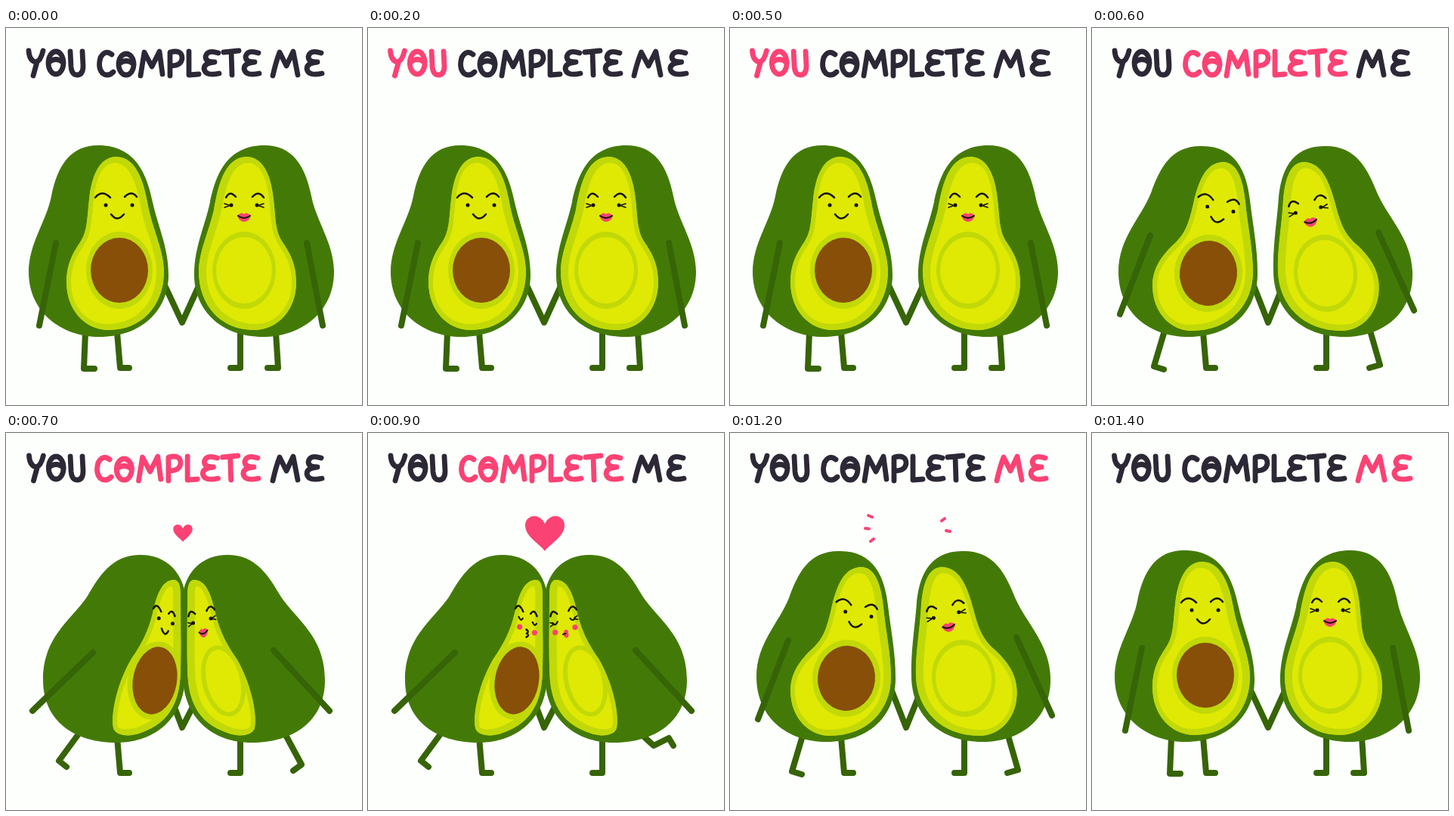
Animation of 471 by 498 pixels, one loop 1.5 s. Source, as an HTML page with a canvas:

```html
<!DOCTYPE html>
<html lang="en">
<head>
<meta charset="utf-8">
<title>You complete me</title>
<style>
html, body { margin: 0; width: 100%; height: 100%; overflow: hidden; background: #fdfffc; }
canvas { display: block; }
</style>
</head>
<body>
<canvas id="stage" width="471" height="498" role="img" aria-label="YOU COMPLETE ME"></canvas>
<script>
const ctx = document.getElementById('stage').getContext('2d');
const INK = '#2d2836', PINK = '#fb4274', BODY = '#437a07', LIMB = '#366407',
      RIM = '#c1d908', FLESH = '#dfe903', PIT = '#874f08', FACE = '#17140c';

// mirror: x of the left shape plus x of the right one; shear: extra tilt of the right one.
// pits: x, y, outer rx, ry, inner rx, ry, tilt.  faces: x, y, x scale, y slant, x slant.
const POSES = {
  apart: {
    mirror: 464, shear: 0,
    body: 'M122 155C85 155 68 182 60 222C54 254 30 285 30 322C30 376 74 408 124 408C178 408 215 374 215 326C215 290 201 262 194 230C187 196 173 155 122 155Z',
    flesh: 'M145 170C122 171 113 198 110 226C107 252 108 268 98 283C88 298 80 312 80 336C80 372 104 399 136 399C180 399 209 366 209 322C209 296 196 270 189 240C184 212 176 170 145 170Z',
    pits: [[150, 320, 44, 51, 38, 43, 0], [315, 320, 42, 51, 37, 44, 0]],
    faces: [[148, 236, 1, 0, 0], [315, 236, 1, 0, 0]],
    arms: 'M66 284L44 393M398 284L419 393',
    limbs: 'M210 340L233 389L254 343M105 402L103 450H117M357 402L360 449H346'
  },
  lean: {
    mirror: 462, shear: .035,
    body: 'M144 156C104 156 90 185 78 218C64 252 35 278 35 322C35 376 76 408 128 408C184 408 219 374 219 324C219 290 213 262 209 228C205 190 190 155 144 156Z',
    flesh: 'M173 177C150 178 141 202 134 232C128 258 124 270 110 284C92 300 80 318 80 340C80 376 104 400 132 400C182 400 213 366 213 322C213 292 206 262 203 230C200 200 192 177 173 177Z',
    pits: [[154, 324, 45, 51, 38, 43, .1], [309, 324, 42, 51, 37, 44, -.1]],
    faces: [[168, 241, .98, .19, -.17], [286.5, 242.5, .98, -.22, .22]],
    arms: 'M77 274L37 378M379 270L426 373',
    limbs: 'M213 338L233 389L250 347M96 400L82 447L95 451M368 400L381 445L367 449'
  },
  kiss: {
    mirror: 471, shear: 0,
    body: 'M176 161C140 162 124 188 108 215C88 246 49 268 49 326C49 382 92 409 146 409C198 409 236 376 237 322C239 280 241 246 237 212C232 182 210 160 176 161Z',
    flesh: 'M222 194C206 194 199 215 194 238C188 262 180 278 166 298C148 328 138 370 142 390C146 401 165 403 186 393C222 378 231 345 231 310C232 280 231 250 231 215C231 202 229 194 222 194Z',
    pits: [[197, 327, 36, 52, 29, 45, .17], [287.5, 327.5, 28, 48, 22, 42, -.24]],
    faces: [[210.5, 250, .52, .2, 0], [259.5, 250, .69, -.18, .13]],
    arms: 'M115 290L35 367M354 287L428 367',
    limbs: 'M222 360L233 389L248 360M95 399L70 433L80 441'
  }
};
const INNER_LEGS = 'M147 402L151 449H163M310 402V449H297';
const LEG_DOWN = 'M370 399L391 438L380 446', LEG_UP = 'M366 402L378 413L398 403L404 413';

const letterO = (x, y, rx, ry) =>
  `M${x - rx} ${y}a${rx} ${ry} 0 1 1 ${2 * rx} 0a${rx} ${ry} 0 1 1 ${-2 * rx} 0q${rx} -9 ${2 * rx} 0`;
const letterE = x => `M${x} 33q-15 -5 -17 5q0 7 12 7q-14 1 -14 9q2 10 20 6`;
// Each word has three slightly different [left, right] extents that cycle.
const WORDS = [
  { path: 'M30 30Q31 44 40 45Q46 43 49 30M41 45L36 63' + letterO(66, 46, 10, 15) + 'M85 31L86 51Q87 62 94 62Q102 62 102 50L101 31',
    spans: [[30, 102], [30.5, 102], [29.5, 101]] },
  { path: 'M140 35Q131 28 125 39Q121 53 128 60Q135 65 142 58' + letterO(159, 48, 10, 14) +
      'M178 63L183 32L193 51L203 31L207 61M217 63V32Q233 28 233 40Q232 50 218 50M242 31V62L255 61' +
      letterE(281) + 'M288 32L308 30M298 31L299 62' + letterE(334),
    spans: [[123, 334], [120, 333], [122, 333]] },
  { path: 'M353 63Q357 45 362 32L371 50L380 31L386 62' + letterE(417),
    spans: [[353, 417], [353, 417], [352, 420]] }
];

function moved(path, matrix) {
  const result = new Path2D();
  result.addPath(new Path2D(path), matrix);
  return result;
}

function fill(path, color) {
  ctx.fillStyle = color;
  ctx.fill(new Path2D(path));
}

function stroke(path, color, width) {
  ctx.strokeStyle = color;
  ctx.lineWidth = width;
  ctx.stroke(new Path2D(path));
}

function ellipse(x, y, rx, ry, tilt, color) {
  ctx.fillStyle = color;
  ctx.beginPath();
  ctx.ellipse(x, y, rx, ry, tilt, 0, 7);
  ctx.fill();
}

function drawBody({ mirror, shear, body, flesh, pits }, side) {
  const [x, y, rx, ry, innerX, innerY, tilt] = pits[side];
  const matrix = new DOMMatrix(side ? [-1, 0, shear, 1, mirror - shear * 408, 0] : [1, 0, 0, 1, 0, 0]);
  const cut = moved(flesh, matrix);
  ctx.save();
  fill(moved(body, matrix), BODY);
  ctx.clip(cut);
  fill(cut, FLESH);
  stroke(moved(flesh, matrix.translate(-2, 0)), RIM, 16);
  ellipse(x, y, rx, ry, tilt, RIM);
  ellipse(x, y, innerX, innerY, tilt, side ? FLESH : PIT);
  ctx.restore();
}

function drawFace([x, y, scaleX, slantY, slantX], side, closed, kissing) {
  const matrix = new DOMMatrix([scaleX, slantY, slantX, 1, x, y]);
  const line = (path, width = 2.2) => stroke(moved(path, matrix), FACE, width);
  const dot = (dx, dy, r, color) => {
    const p = matrix.transformPoint({ x: dx, y: dy });
    ellipse(p.x, p.y, r, r, 0, color);
  };
  line(side ? 'M-24 -12q5 -10 13 -1M11 -13q8 -9 15 1' : 'M-30 -12q9 -11 20 0M9 -13q9 -9 16 0', 2.5);

  for (const ex of side ? [-17, 17] : [-16, 19]) {
    if (closed) line(`M${ex - 5} -3q5 6 10 0`);
    else dot(ex, -2, 2.5, FACE);
    if (side) {
      const s = Math.sign(ex);
      line(`M${ex + 3 * s} -2l${6 * s} -2M${ex + 3 * s} -1l${6 * s} 2`, 1.6);
    }
  }

  if (kissing) for (const cx of [-19, 19]) dot(cx, 10, 3.6, PINK);
  if (!side) return line(kissing ? 'M-2 10q8 1 1 5q8 1 -1 5' : 'M-9 10q8 11 17 0', 2.5);
  fill(moved(kissing ? 'M-5 15q3 -6 7 -5q5 1 3 5q2 4 -3 6q-4 0 -7 -6Z'
                     : 'M-9 12q6 -6 9 -2q3 -4 9 2q-3 8 -9 8q-6 0 -9 -8Z', matrix), PINK);
  line(kissing ? 'M-5 15h5' : 'M-8 12q8 6 16 0', 2);
}

function drawHeart(size) {
  ctx.save();
  ctx.translate(234, 132);
  ctx.scale(size, size);
  fill('M0 24C-6 15 -26 5 -26 -10C-26 -24 -7 -28 0 -12C7 -28 26 -24 26 -10C26 5 6 15 0 24Z', PINK);
  ctx.restore();
}

function drawWord({ path, spans }, boil, color) {
  const [left, right] = spans[0], [a, b] = spans[boil];
  const k = (b - a) / (right - left);
  stroke(moved(path, new DOMMatrix([k, 0, 0, 1, a - left * k, 0])), color, 6.8);
}

function draw(step) {
  const kissing = step >= 7 && step <= 10;
  const pose = POSES[kissing ? 'kiss' : step === 6 || step === 11 || step === 12 ? 'lean' : 'apart'];
  const pucker = step >= 8 && step <= 10;
  const activeWord = step === 0 ? -1 : step < 6 ? 0 : step < 11 ? 1 : 2;

  ctx.fillStyle = '#fdfffc';
  ctx.fillRect(0, 0, 471, 498);
  ctx.lineCap = ctx.lineJoin = 'round';

  WORDS.forEach((word, i) => drawWord(word, step % 3, i === activeWord ? PINK : INK));
  stroke(pose.limbs + INNER_LEGS, LIMB, 8);
  if (kissing) stroke(pucker ? LEG_UP : LEG_DOWN, LIMB, 8);

  for (const side of [0, 1]) {
    drawBody(pose, side);
    drawFace(pose.faces[side], side, pucker || (side === 1 && step === 3), pucker);
  }
  stroke(pose.arms, LIMB, 8);

  if (kissing) drawHeart([.49, .8, 1, 1][step - 7]);
  if (step === 11 || step === 12)
    stroke('M183 109l5 2M179 126l5 .5M186 143l4 -3M280 116l4 -3M286 129l5 1', PINK, 4);
}

const start = performance.now();
function tick() {
  draw(Math.floor((performance.now() - start) / 100) % 15);
  requestAnimationFrame(tick);
}
tick();
</script>
</body>
</html>
```
